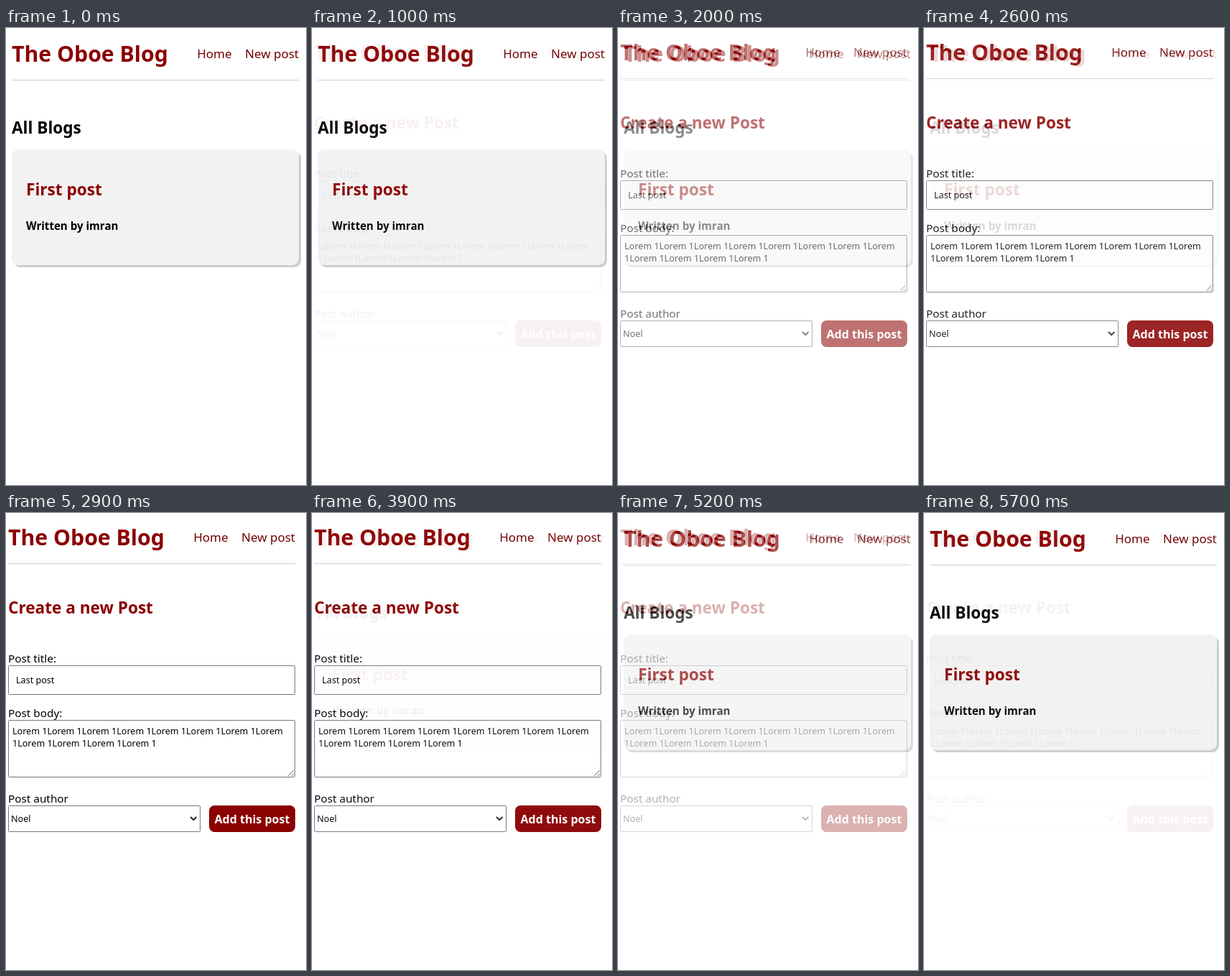
Animation of 418x636 px, one loop 5.8 s. Source, as an HTML page:

```html
<!DOCTYPE html>
<html lang="en">
<head>
<meta charset="utf-8">
<title>Blog pages</title>
<style>
  html, body { margin: 0; width: 100%; height: 100%; overflow: hidden; background: #fff; }
  svg { display: block; width: 418px; height: 636px; font-family: "Noto Sans", "Open Sans", sans-serif; }
  text { white-space: pre; }
  .title { font-size: 30.2px; font-weight: 700; fill: #8b0000; }
  .nav { font-size: 17px; fill: #700000; text-anchor: end; }
  .head { font-size: 22.6px; font-weight: 700; }
  .red { fill: #8b0000; }
  .by { font-size: 15.08px; font-weight: 700; }
  .label { font-size: 15.3px; }
  .field { font-size: 12.57px; }
  .button { font-size: 16px; font-weight: 700; fill: #fff; text-anchor: middle; }
  .box { fill: #fff; stroke: #767676; }
</style>
</head>
<body>
<svg viewBox="0 0 418 636">
  <defs>
    <g id="header">
      <text class="title" x="8" y="47">The Oboe Blog</text>
      <text class="nav" x="314.5" y="42">Home</text>
      <text class="nav" x="408" y="42">New post</text>
      <rect x="8" y="72" width="400" height="1" fill="#ccc"/>
    </g>
  </defs>

  <g id="list">
    <use href="#header"/>
    <text class="head" x="8" y="147">All Blogs</text>
    <rect x="11" y="172" width="400" height="161" rx="9" fill="#ccc"/>
    <rect x="8" y="169" width="400" height="161" rx="9" fill="#f2f2f2"/>
    <text class="head red" x="28" y="233">First post</text>
    <text class="by" x="28" y="281">Written by imran</text>
  </g>

  <g id="form" opacity="0">
    <rect width="418" height="636" fill="#fff"/>
    <use href="#header" x="-5" y="-2"/>
    <text class="head red" x="3" y="140">Create a new Post</text>

    <text class="label" x="3" y="208">Post title:</text>
    <rect class="box" x="3.5" y="212.5" width="399" height="40" rx="1"/>
    <text class="field" x="14" y="237">Last post</text>

    <text class="label" x="3" y="284">Post body:</text>
    <rect class="box" x="3.5" y="288.5" width="399" height="79" rx="1"/>
    <text class="field" x="9" y="308">Lorem 1Lorem 1Lorem 1Lorem 1Lorem 1Lorem 1Lorem 1Lorem</text>
    <text class="field" x="9" y="325">1Lorem 1Lorem 1Lorem 1Lorem 1</text>
    <path d="M393 366l8-8M398 366l3-3" stroke="#666" fill="none"/>

    <text class="label" x="3" y="403">Post author</text>
    <rect class="box" x="3.5" y="407.5" width="267" height="36" rx="1"/>
    <text class="field" x="7" y="430">Noel</text>
    <path d="M257 423l4.2 4.2 4.2-4.2" stroke="#222" stroke-width="2" fill="none"/>

    <rect x="283" y="407" width="120" height="37" rx="7.5" fill="#8b0000"/>
    <text class="button" x="343" y="432">Add this post</text>
  </g>
</svg>
<script>
  const LOOP = 5800, HOLD = 900, STEP = 100, STEPS = 20;
  const form = document.getElementById("form");
  const start = performance.now();

  // Stepped 0..1 progress of a fade whose first step lands STEP after `from`
  const fade = (t, from) =>
    Math.min(STEPS, Math.max(0, Math.floor((t - from) / STEP))) / STEPS;

  function draw(t) {
    form.setAttribute("opacity", fade(t, HOLD) - fade(t, HOLD + LOOP / 2));
  }

  function tick(now) {
    draw(Math.max(0, now - start) % LOOP);
    requestAnimationFrame(tick);
  }

  draw(0);
  requestAnimationFrame(tick);
</script>
</body>
</html>
```
